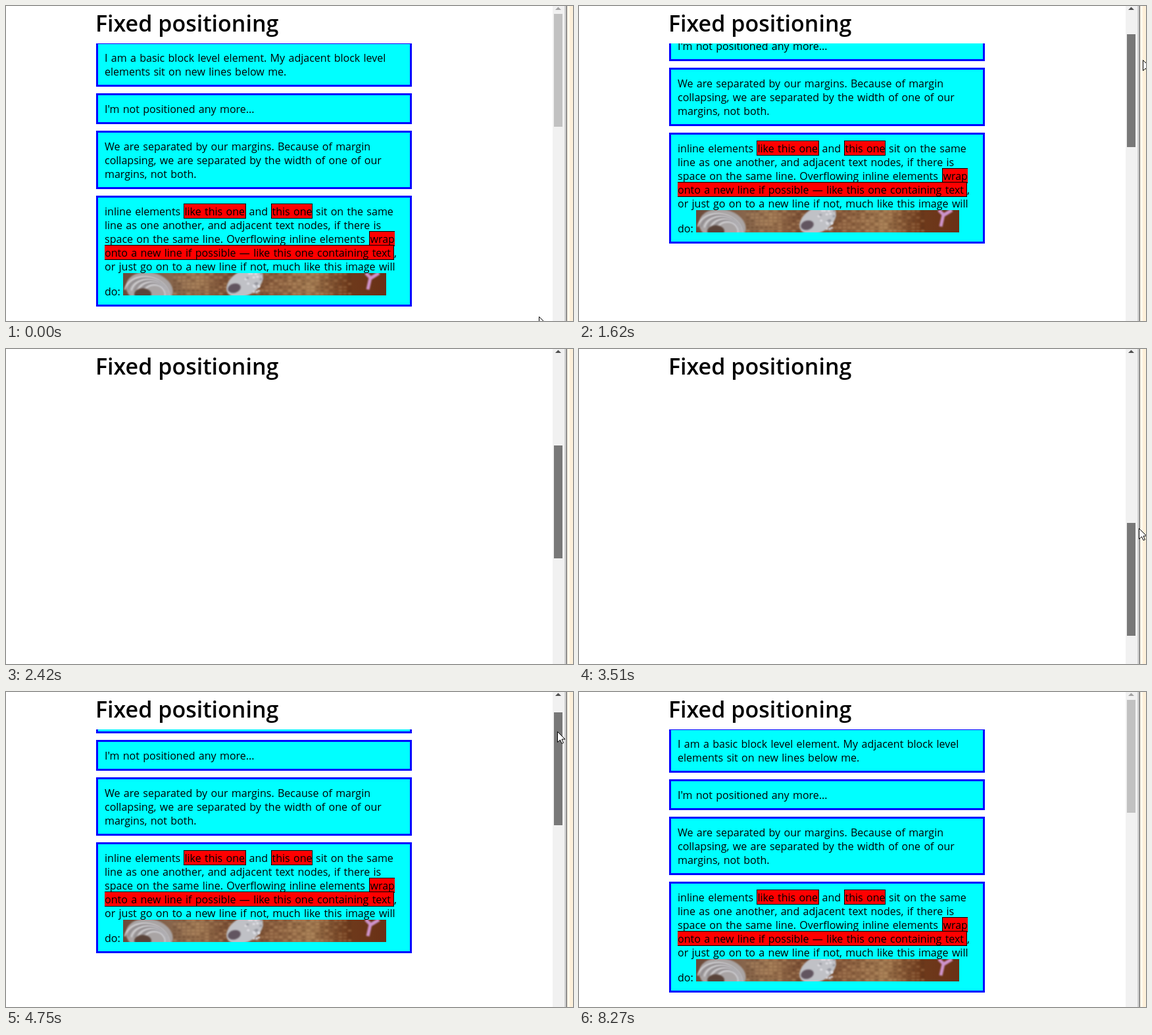
Recreate the animation shown at these times as an HTML page with a canvas. Size 862 px wide and 480 px high, loop 8.43 s.

```html
<!DOCTYPE html>
<html lang="en">
<head>
<meta charset="utf-8">
<title>Fixed positioning</title>
<style>
  html, body { margin: 0; width: 100%; height: 100%; overflow: hidden; background: #fff; }
  canvas { display: block; }
</style>
</head>
<body>
<canvas id="stage" width="862" height="480"></canvas>
<script>
const ctx = document.getElementById('stage').getContext('2d');
const LOOP = 8430, STEP = 78.1, SHIFT = 24;
const FONT = '"Open Sans", "Noto Sans", sans-serif';
const LEFT = 137, WIDTH = 480, LINE = 21, EDGE = 3, PAD = 10, GAP = 10;
const PRESS = 14, RELEASE = 68;

const paragraphs = [
  ['I am a basic block level element. My adjacent block level',
   'elements sit on new lines below me.'],
  ["I'm not positioned any more..."],
  ['We are separated by our margins. Because of margin',
   'collapsing, we are separated by the width of one of our',
   'margins, not both.']
];

// 0 before step a, 1 after step b
const ramp = (k, a, b) => Math.min(1, Math.max(0, (k - a) / (b - a)));
const easeOut = (f, p) => 1 - (1 - f) ** p;
const lerp = (a, b, f) => a + (b - a) * f;

function scrollAt(k) {
  return 226 * ramp(k, 13, 25) ** 2.1 + 128 * ramp(k, 26, 29) + 526 * ramp(k, 30, 39)
    - 754 * ramp(k, 44, 51) - 36 * ramp(k, 56, 58) - 90 * easeOut(ramp(k, 60, 66), 2.2);
}

const thumbAt = scroll => Math.floor(12 + scroll / 3.05);

function mouseAt(k, thumb) {
  if (k < 6) {
    const f = k / 6;
    return { x: lerp(810, 838, f), y: lerp(473, 46, f) };
  }
  if (k < RELEASE) {
    const grab = 34 + 5 * ramp(k, 7, 9) - 31 * ramp(k, 30, 39) + 21 * ramp(k, 45, 51);
    const x = 838 + 5 * ramp(k, 7, 9) + 21 * ramp(k, 13, 25)
      - 13 * ramp(k, 30, 45) - 13 * ramp(k, 45, 61);
    return { x, y: thumb + grab };
  }
  if (k < 70) {
    const f = ramp(k, 67, 69);
    return { x: lerp(838, 587, f), y: lerp(41, 6, f) };
  }
  if (k >= 74 && k < 85) {
    const f = ramp(k, 74, 84);
    return { beam: true, x: 312 - 17 * Math.sin(Math.PI * f), y: 12 + 41 * f ** 0.9 };
  }
  if (k >= 85 && k < 91) {
    const f = ramp(k, 84, 90);
    return { x: lerp(316, 812, f), y: lerp(52, 446, f) };
  }
  return null;
}

function rect(c, color, x, y, w, h) {
  c.fillStyle = color;
  c.fillRect(x, y, w, h);
}

function ellipse(c, color, x, y, rx, ry, turn = 0) {
  c.fillStyle = color;
  c.beginPath();
  c.ellipse(x, y, rx, ry, turn, 0, Math.PI * 2);
  c.fill();
}

function polygon(color, points) {
  ctx.fillStyle = color;
  ctx.beginPath();
  points.forEach(([x, y]) => ctx.lineTo(x, y));
  ctx.closePath();
  ctx.fill();
}

function text(str, x, y) {
  ctx.fillStyle = '#000';
  ctx.fillText(str, x, y);
}

// Soft stand-in for the photo strip
function makePhoto() {
  const cv = document.createElement('canvas');
  cv.width = 400;
  cv.height = 34;
  const c = cv.getContext('2d');
  let seed = 7;
  const rnd = () => (seed = seed * 16807 % 2147483647) / 2147483647;
  const g = c.createLinearGradient(0, 0, 400, 0);
  ['#6b4a3a', '#80604a', '#9a7350', '#74482f', '#8c6040', '#a07850', '#6e3a1c', '#6a3015']
    .forEach((color, i) => g.addColorStop(i / 7, color));
  rect(c, g, 0, 0, 400, 34);

  c.filter = 'blur(1px)';
  for (let x = 76; x < 348; x += 7) {
    for (let y = 0; y < 34; y += 5) {
      c.globalAlpha = 0.15 + rnd() * 0.2;
      rect(c, rnd() < 0.5 ? '#d0a877' : '#50301c', x, y, 5, 3);
    }
  }
  c.globalAlpha = 1;

  ellipse(c, '#a9a4a4', 40, 24, 36, 25, 0.2);
  c.lineWidth = 2;
  for (let i = 0; i < 7; i++) {
    c.strokeStyle = i % 2 ? '#8c888c' : '#d8d8dc';
    c.beginPath();
    c.ellipse(36 + i * 2, 32, 34 - i * 3, 26 - i * 2, 0.2, Math.PI, Math.PI * 2);
    c.stroke();
  }
  ellipse(c, '#5a443a', 30, 32, 13, 9);

  ellipse(c, '#c0c1c6', 185, 15, 30, 19, -0.5);
  ellipse(c, '#625560', 169, 23, 10, 7, -0.3);
  for (let i = 0; i < 22; i++) {
    ellipse(c, i % 3 ? '#e6e6ec' : '#93949c', 184 + rnd() * 26, rnd() * 30, 2, 1.5);
  }

  c.strokeStyle = '#cf94cc';
  c.lineWidth = 5;
  c.beginPath();
  c.moveTo(369, 0);
  c.lineTo(376, 7);
  c.lineTo(372, 25);
  c.moveTo(389, 0);
  c.lineTo(376, 8);
  c.stroke();
  return cv;
}
const photo = makePhoto();

function box(y, h) {
  rect(ctx, '#00f', LEFT, y, WIDTH, h);
  rect(ctx, '#0ff', LEFT + EDGE, y + EDGE, WIDTH - 2 * EDGE, h - 2 * EDGE);
}

// Red inline box; open sides mark a wrapped element
function mark(x, y, w, left = 1, right = 1) {
  rect(ctx, '#000', x, y, w, 23);
  rect(ctx, '#f00', x + left, y + 1, w - left - right, 21);
}

function drawInlineBlock(top) {
  const x = LEFT + EDGE + PAD;
  const row = i => top + 30 + LINE * i;
  box(top, 169);
  mark(270, row(0) - 18, 95);
  mark(403, row(0) - 18, 63);
  mark(552, row(2) - 18, 39, 1, 0);
  mark(150, row(3) - 18, 440, 0, 1);
  text('inline elements', x, row(0));
  text('like this one', 271.5, row(0));
  text('and', 369.5, row(0));
  text('this one', 404.5, row(0));
  text('sit on the same', 471, row(0));
  text('line as one another, and adjacent text nodes, if there is', x, row(1));
  text('space on the same line. Overflowing inline elements', x, row(2));
  text('wrap', 553.5, row(2));
  text('onto a new line if possible — like this one containing text', x, row(3));
  text(',', 590, row(3));
  text('or just go on to a new line if not, much like this image will', x, row(4));
  text('do:', x, top + 152);
  ctx.drawImage(photo, 178, top + 118);
}

function drawBlocks(scroll) {
  ctx.save();
  ctx.beginPath();
  ctx.rect(LEFT, 57, WIDTH, 423);
  ctx.clip();
  ctx.translate(0, -Math.round(scroll));
  ctx.font = '16.05px ' + FONT;
  ctx.wordSpacing = '1.15px';
  let y = 55;
  for (const lines of paragraphs) {
    const h = lines.length * LINE + 2 * (EDGE + PAD);
    box(y, h);
    lines.forEach((line, i) => text(line, LEFT + EDGE + PAD, y + 30 + LINE * i));
    y += h + GAP;
  }
  drawInlineBlock(y);
  ctx.restore();
}

function thumbColor(k) {
  if (k >= PRESS && k < RELEASE) return '#787878';
  return k >= 6 && k < PRESS ? '#a8a8a8' : '#c1c1c1';
}

function drawScrollbar(thumb, k) {
  rect(ctx, '#f1f1f1', 831, 0, 18, 480);
  polygon(thumb > 12 ? '#505050' : '#a3a3a3', [[835, 6], [839.5, 1.5], [844, 6]]);
  rect(ctx, thumbColor(k), 833, thumb, 13, 172);
  rect(ctx, '#d4d4d4', 849, 0, 1, 480);
  rect(ctx, '#c4c4c4', 850, 0, 2, 480);
  rect(ctx, '#5c5c5c', 852, 0, 1, 480);
  rect(ctx, '#fff8ec', 853, 0, 4, 480);
  rect(ctx, '#fdf0d9', 857, 0, 5, 480);
}

function drawArrow(x, y) {
  ctx.save();
  ctx.translate(Math.round(x) + 0.5, Math.round(y) + 0.5);
  polygon('#fff', [[0, 0], [0, 16], [4, 12.5], [6.5, 18], [9, 17], [6.5, 11.5], [11.5, 11.5]]);
  ctx.strokeStyle = '#000';
  ctx.lineWidth = 1;
  ctx.stroke();
  ctx.restore();
}

function drawBeam(x, y) {
  x = Math.round(x);
  y = Math.round(y);
  rect(ctx, '#fff', x - 1, y - 8, 3, 16);
  rect(ctx, '#000', x, y - 7, 1, 14);
  for (const end of [y - 8, y + 7]) {
    rect(ctx, '#000', x - 3, end, 3, 1);
    rect(ctx, '#000', x + 1, end, 3, 1);
  }
}

function draw(t) {
  const k = Math.floor((t + SHIFT) / STEP);
  const scroll = scrollAt(k);
  const thumb = thumbAt(scroll);
  const mouse = mouseAt(k, thumb);
  rect(ctx, '#fff', 0, 0, 862, 480);
  drawBlocks(scroll);
  ctx.font = '600 34px ' + FONT;
  ctx.wordSpacing = '0px';
  text('Fixed positioning', 136, 39);
  drawScrollbar(thumb, k);
  if (mouse) (mouse.beam ? drawBeam : drawArrow)(mouse.x, mouse.y);
}

const start = performance.now();
function tick() {
  draw((performance.now() - start) % LOOP);
  requestAnimationFrame(tick);
}
tick();
</script>
</body>
</html>
```
